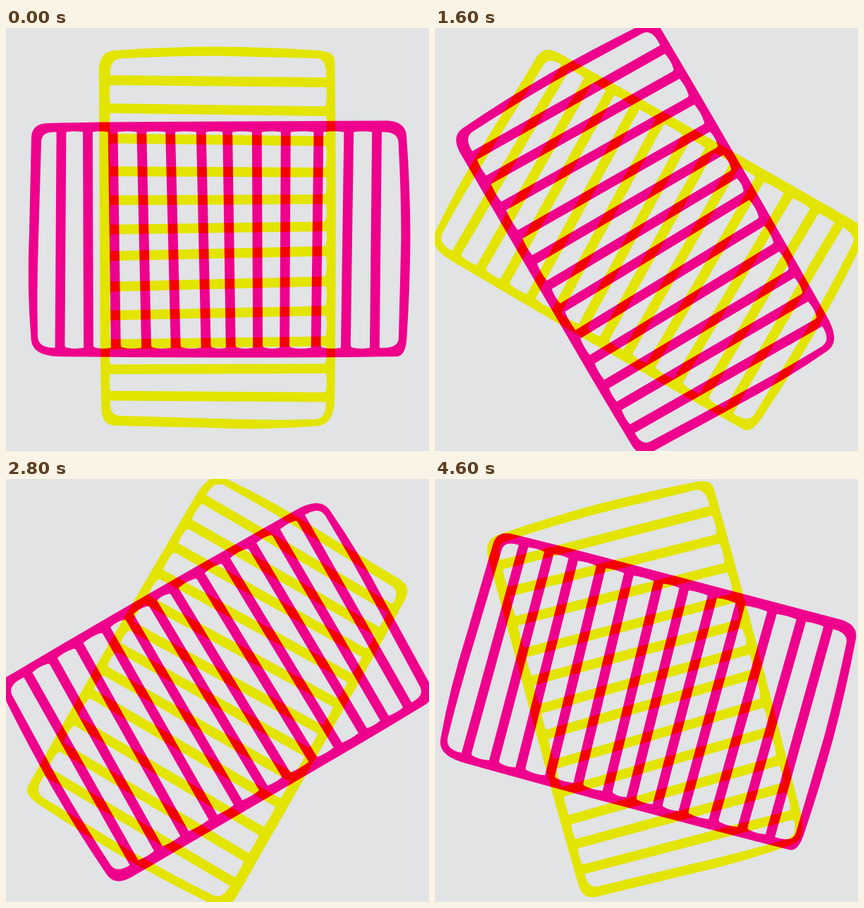
Recreate the animation shown at these times as an HTML page with a canvas. Size 600 by 600 pixels, loop 4.8 s.

```html
<!DOCTYPE html>
<html lang="en">
<head>
<meta charset="utf-8">
<title>Counter-rotating grids</title>
<style>
  html, body { margin: 0; width: 100%; height: 100%; overflow: hidden; background: #e1e3e5; }
  canvas { display: block; width: 600px; height: 600px; }
</style>
</head>
<body>
<canvas id="stage" width="600" height="600"></canvas>
<script>
const ctx = document.getElementById('stage').getContext('2d');
const YELLOW = '#e3e400', PINK = '#ee008c', RED = '#f30000';
const STEPS = 24, STEP_MS = 200;
const LEFT = 148.5, RIGHT = 454.5, BAR = 13.8;

// Hand-drawn bars: uneven heights, with a tilt that swings down the grid.
const heights = [76, 116.4, 159, 204.5, 244, 284, 320.3, 363.6, 404.8, 446.8, 484, 523];
const bars = heights.map((y, i) => {
  const tilt = 6 * Math.cos(2 * Math.PI * (i - 1.2) / 11.5) - 1.6;
  return { left: y - tilt / 2, right: y + tilt / 2 };
});

// The space between two bars, with slightly bulging ends.
function gapPath(above, below) {
  const tl = above.left + BAR / 2, tr = above.right + BAR / 2;
  const bl = below.left - BAR / 2, br = below.right - BAR / 2;
  return `M${LEFT} ${tl}L${RIGHT} ${tr}Q${RIGHT + 2.5} ${(tr + br) / 2} ${RIGHT} ${br - 4}` +
    `Q${RIGHT} ${br} ${RIGHT - 4} ${br}L${LEFT} ${bl}Q${LEFT - 2} ${(tl + bl) / 2} ${LEFT} ${tl}Z`;
}

function gridPath() {
  const first = bars[0], last = bars[bars.length - 1];
  const outline =
    'M132.5 62C132.5 46 138 34 153 32.5Q228 27 300 27Q370 27.5 440 32' +
    'C458 33 467 38 467 47Q468.5 150 468.5 300Q468 430 467 525' +
    'C466 547 461 564 441 565Q370 571 290 567.5L156 564.5' +
    'C144 563.5 137 558 136 542Q134 450 134 380Z';
  const topGap = `M${LEFT} ${first.left - BAR / 2}` +
    'C148 54 152 45 162 44Q232 40 300 40L441 43.5' +
    `C451 44 456 53 ${RIGHT} ${first.right - BAR / 2}Z`;
  const bottomGap = `M${LEFT} ${last.left + BAR / 2}L${RIGHT} ${last.right + BAR / 2}` +
    'C455 547 450 555 438 555.5Q370 557 300 554.5L162 550.5' +
    `C152 550 148 543 ${LEFT} ${last.left + BAR / 2}Z`;
  const gaps = bars.slice(1).map((bar, i) => gapPath(bars[i], bar));
  return new Path2D(outline + topGap + gaps.join('') + bottomGap);
}

const grid = gridPath();
const yellowPose = { cx: 300.9, cy: 299.3, dx: -0.7, dy: -0.4 };
const pinkPose = { cx: 300.7, cy: 299.8, dx: 0, dy: 0 };

function drawGrid(color, { cx, cy, dx, dy }, degrees, mode) {
  ctx.save();
  ctx.globalCompositeOperation = mode;
  ctx.translate(cx, cy);
  ctx.rotate(degrees * Math.PI / 180);
  ctx.translate(dx - cx, dy - cy);
  ctx.fillStyle = color;
  ctx.fill(grid, 'evenodd');
  ctx.restore();
}

function draw(time) {
  const turn = Math.floor(time / STEP_MS) % STEPS * 360 / STEPS;
  ctx.clearRect(0, 0, 600, 600);
  drawGrid(YELLOW, yellowPose, turn, 'source-over');
  drawGrid(RED, pinkPose, 90 - turn, 'source-atop');
  drawGrid(PINK, pinkPose, 90 - turn, 'destination-over');
}

function tick() {
  draw(performance.now());
  requestAnimationFrame(tick);
}
tick();
</script>
</body>
</html>
```
